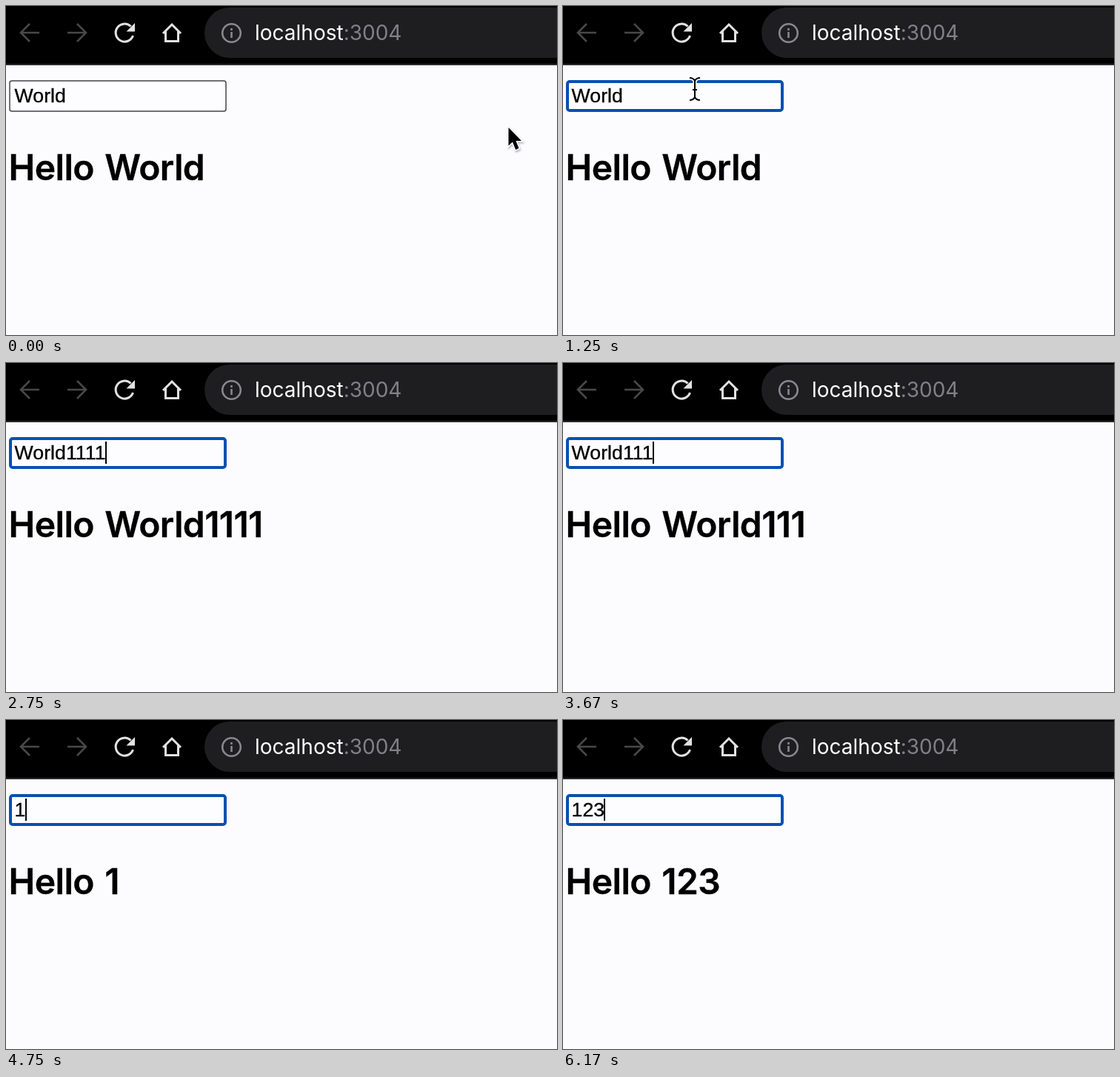
Recreate the animation shown at these times as an HTML page. Size 744 px wide and 444 px high, loop 6330 ms.

```html
<!DOCTYPE html>
<html lang="en">
<head>
<meta charset="utf-8">
<title>Hello World</title>
<style>
  html, body { margin: 0; width: 100%; height: 100%; overflow: hidden; background: #fcfcfe; }
  svg { display: block; width: 744px; height: 444px; }
  text { white-space: pre; }
  .line { fill: none; stroke-width: 3; }
  .dim { stroke: #48484a; stroke-width: 2.6; }
  .lit { stroke: #e2e2e4; }
  .info { stroke: #88888f; stroke-width: 2.6; }
  .url { font: 28px Inter, sans-serif; fill: #fff; }
  .port { fill: #808086; }
  .value { font: 26.667px "Liberation Sans", Arial, sans-serif; letter-spacing: .05px; stroke: #000; stroke-width: .35; }
  .title { font: 600 48px Inter, sans-serif; letter-spacing: -.65px; word-spacing: 3px; stroke: #000; stroke-width: .3; }
  #field { fill: #fdfdff; }
  .idle { stroke: #444446; stroke-width: 1.5; }
  .hover { stroke: #1c1c1e; stroke-width: 2; }
  .focus { stroke: #0850b0; stroke-width: 4; }
  #arrow { filter: drop-shadow(1px 2px 1px #8888a099); }
  #arrow path { stroke: #fff; stroke-width: 3; paint-order: stroke; }
  #beam path { fill: none; stroke: #000; stroke-width: 2; }
  #beam path:first-child { stroke: #fff; stroke-width: 5; }
</style>
</head>
<body>
<svg viewBox="0 0 744 444">
  <rect width="744" height="444" fill="#fcfcfe"/>
  <rect width="744" height="80" fill="#000"/>
  <rect y="78" width="744" height="2" fill="#29292b"/>
  <rect x="268" y="2" width="540" height="68" rx="34" fill="#1e1e20"/>

  <path class="line dim" d="M45 36H21M32 24L20 36l12 12M83 36h24M96 24l12 12-12 12"/>
  <path class="line lit" d="M171.5 40A12 12 0 1 1 168.5 27.5"/>
  <path fill="#e2e2e4" d="M174 23v11.5h-11.5z"/>
  <path class="line lit" d="M212 37L224 25l12 12M215.5 34v13.5h17V34"/>
  <circle class="line info" cx="304.5" cy="36.5" r="12.3"/>
  <path class="line info" d="M304.5 35v8M304.5 30v3"/>
  <text class="url" x="336" y="46">localhost<tspan class="port">:3004</tspan></text>

  <rect id="field"/>
  <text id="value" class="value" x="11.6" y="130"></text>
  <rect id="caret" y="106" width="2" height="30"/>
  <text id="title" class="title" x="3.6" y="234.5"></text>

  <g id="beam">
    <path d="M-7-15q5 0 7 4q2-4 7-4M0-11v22M-7 15q5 0 7-4q2 4 7 4M-3 1h6"/>
    <path d="M-7-15q5 0 7 4q2-4 7-4M0-11v22M-7 15q5 0 7-4q2 4 7 4M-3 1h6"/>
  </g>
  <g id="arrow"><path d="M0 0V24.5L5.5 19.5L9.7 30L14 28L10 18H17.5Z"/></g>
</svg>
<script>
  const LOOP = 6330;
  const TEXT_LEFT = 11.35;
  const start = {
    value: "World", name: "World", border: "idle", caret: false, arrow: [678.5, 164], beam: null
  };
  const typed = text => ({ value: text, name: text, caret: true });

  // Each cue changes part of the state and holds until the next one.
  const cues = [
    [170, { arrow: [400, 150] }],
    [250, { arrow: null, beam: [205, 119], border: "hover" }],
    [420, { beam: [196, 117] }],
    [500, { beam: [182, 113] }],
    [580, { beam: [178, 112] }],
    [670, { border: "focus" }],
    [750, { caret: true }],
    [1250, { caret: false }],
    [1500, { ...typed("World1"), beam: null }],
    [1830, typed("World11")],
    [2330, typed("World111")],
    [2670, { value: "World1111" }],
    [2750, { name: "World1111" }],
    [3170, { caret: false }],
    [3580, { value: "World111", caret: true }],
    [3670, { name: "World111" }],
    [3830, { value: "World1", name: "World11" }],
    [3920, { value: "Worl", name: "World" }],
    [4000, { value: "W", name: "Wo" }],
    [4080, { value: "", name: "W" }],
    [4170, { name: "" }],
    [4670, { value: "1" }],
    [4750, { name: "1" }],
    [5000, typed("12")],
    [5170, typed("123")],
    [5580, { beam: [179, 112], arrow: [306, 194] }],
    [5670, { beam: null, arrow: [440, 278], caret: false }],
    [5750, { arrow: [560, 362] }],
    [5840, { arrow: [632, 424] }],
    [5920, { arrow: null }],
    [6170, { caret: true }]
  ];

  const $ = id => document.getElementById(id);
  const insets = { idle: 1, hover: 1, focus: 2 };

  function show(id, visible) {
    $(id).setAttribute("visibility", visible ? "visible" : "hidden");
  }

  function place(id, point) {
    show(id, point);
    if (point) $(id).setAttribute("transform", `translate(${point})`);
  }

  function setField(border) {
    const inset = insets[border];
    const box = { x: 4 + inset, y: 100 + inset, width: 294 - 2 * inset, height: 43 - 2 * inset, rx: 3, class: border };
    for (const key in box) $("field").setAttribute(key, box[key]);
  }

  function draw(state) {
    setField(state.border);
    $("value").textContent = state.value;
    $("title").textContent = "Hello " + state.name;
    const width = state.value ? $("value").getComputedTextLength() : 0;
    $("caret").setAttribute("x", Math.max(12, Math.floor(TEXT_LEFT + width)));
    show("caret", state.caret);
    place("arrow", state.arrow);
    place("beam", state.beam);
  }

  let drawn = -1;
  const began = performance.now();

  function tick() {
    const time = (performance.now() - began) % LOOP;
    const past = cues.filter(([at]) => at <= time);
    if (past.length !== drawn) {
      drawn = past.length;
      draw(Object.assign({}, start, ...past.map(([, change]) => change)));
    }
    requestAnimationFrame(tick);
  }
  tick();
</script>
</body>
</html>
```
